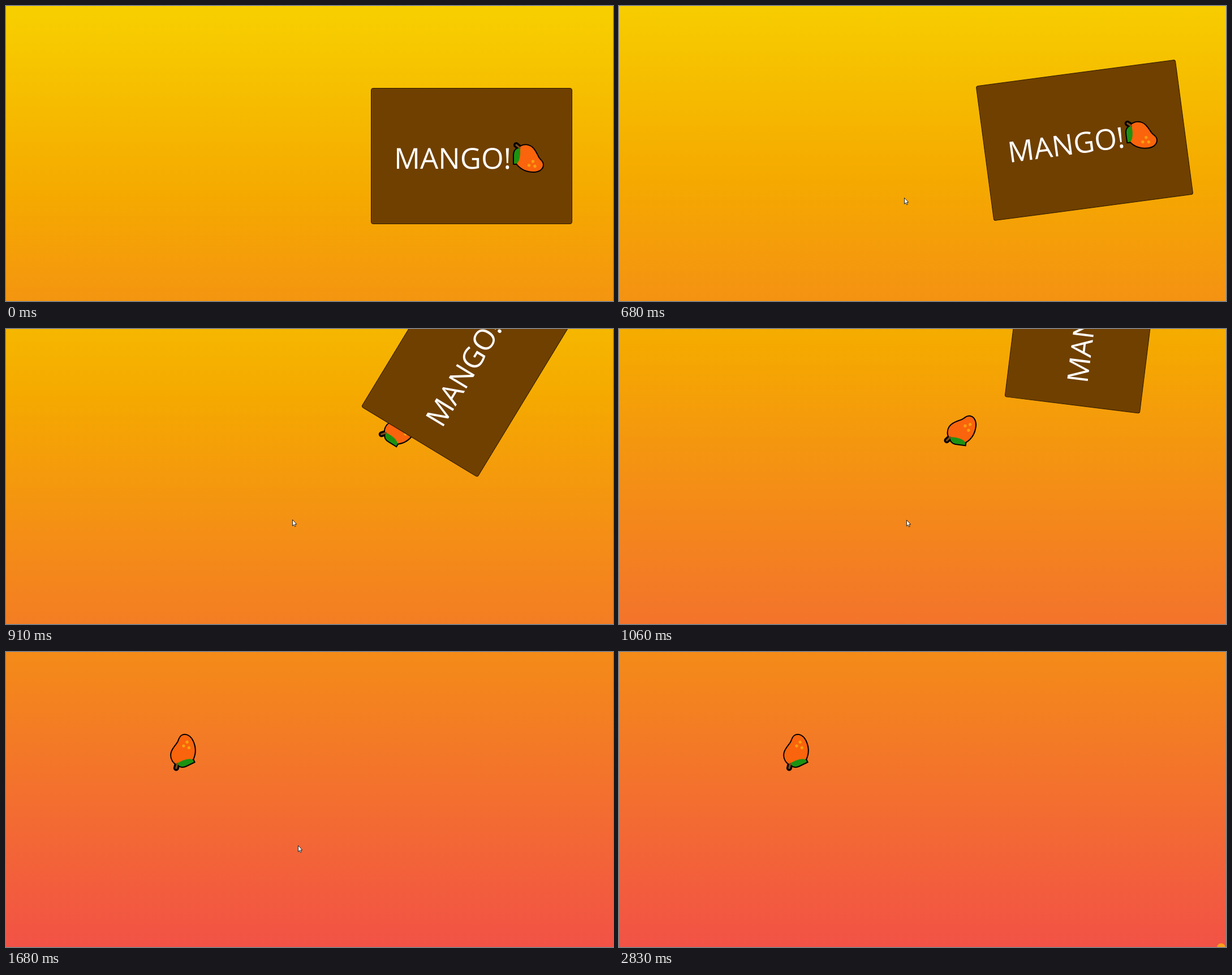
These frames come from a looping animation (1073 by 522 pixels, 2910 ms). An HTML page:

```html
<!DOCTYPE html>
<html lang="en">
<head>
<meta charset="utf-8">
<title>Mango</title>
<style>
  html, body { margin: 0; width: 100%; height: 100%; overflow: hidden; background: #f7d000; }
  svg { display: block; width: 100%; height: 100%; }
  text { font: 51px "Open Sans", "Noto Sans", sans-serif; fill: #fff; text-rendering: geometricPrecision; }
</style>
</head>
<body>
<svg viewBox="0 0 1073 522">
  <defs>
    <linearGradient id="sky" x1="0" y1="0" x2="0" y2="1">
      <stop offset="0" stop-color="#f7d000"/>
      <stop offset=".3" stop-color="#f5a900"/>
      <stop offset="1" stop-color="#f25246"/>
    </linearGradient>
    <path id="flesh" d="M-16-18C-12-22-4-23 2-20C9-17 13-8 17 0C20 5 25 7 25 13C25 20 18 25 9 25C-4 25-14 20-21 11Z"/>
    <path id="leaf" d="M-15-17C-22-16-26-12-26-4V11H-22C-17 8-16 2-15-6Z"/>
  </defs>

  <rect id="page" width="1073" height="1132" fill="url(#sky)"/>

  <g id="scene">
    <g id="card">
      <rect x="-177.5" y="-120" width="355" height="240" rx="3.5" fill="#704000" stroke="#2a1800"/>
      <text x="-137" y="22">MANGO!</text>
    </g>
    <g id="mango">
      <g stroke="#000" stroke-width="4">
        <use href="#flesh"/>
        <use href="#leaf"/>
      </g>
      <path d="M-22-22L-15-16" stroke="#000" stroke-width="10" stroke-linecap="round"/>
      <use href="#flesh" fill="#fa640c"/>
      <use href="#leaf" fill="#1c9212"/>
      <path d="M-22-22L-16-17" stroke="#7a4a1c" stroke-width="3.4" stroke-linecap="round"/>
      <g fill="#f5a010">
        <circle cx="7.5" cy="7" r="2.7"/>
        <circle cx=".5" cy="14" r="2.7"/>
        <circle cx="11" cy="15.5" r="2.7"/>
      </g>
    </g>
  </g>

  <circle id="dot" cx="1064.5" cy="523" r="7.5" fill="#f9a01e"/>
  <path id="cursor" d="M.5.5V11.3L2.9 9L4.6 12.7L6.3 11.9L4.7 8.3H7.8Z" fill="#fff" stroke="#111" stroke-width=".9"/>
</svg>

<script>
const LOOP = 2910;
const STEPS = [0, 70, 140, 210, 290, 360, 680, 760, 840, 910, 990, 1060, 1140,
  1220, 1310, 1380, 1460, 1530, 1600, 1680, 1830, 1910, 1990, 2070, 2830];

// time, scroll offset
const SCROLL = [[360, 0], [680, 28], [760, 90], [840, 163], [910, 217.5], [1220, 403], [1680, 610]];
// time, x, y
const POINTER = [[70, 833, 449], [140, 700, 400], [210, 590, 362], [290, 525, 343], [360, 504, 339],
  [840, 504, 339], [910, 506, 337], [1220, 510, 338], [1680, 516, 342],
  [1830, 570, 364], [1910, 705, 412], [1990, 880, 470]];
// scroll, x, y, turn of the loose fruit
const FRUIT = [[100, 811, 180, 27], [217.5, 694, 179, 58.6], [403, 508, 177, 108.9], [610, 311, 176, 116]];

const CARD = { x: 823, y: 265.5 };
const DETACH = 110;
const TURN = 0.27;

const $ = id => document.getElementById(id);
const [page, scene, card, mango, dot, cursor] =
  ["page", "scene", "card", "mango", "dot", "cursor"].map($);

function track(rows, at) {
  const last = rows[rows.length - 1];
  if (at <= rows[0][0]) return rows[0].slice(1);
  if (at >= last[0]) return last.slice(1);
  const i = rows.findIndex(r => r[0] > at);
  const a = rows[i - 1], b = rows[i];
  const k = (at - a[0]) / (b[0] - a[0]);
  return a.slice(1).map((v, j) => v + (b[j + 1] - v) * k);
}

function place(el, x, y, turn = 0) {
  el.setAttribute("transform", `translate(${x} ${y}) rotate(${-turn})`);
}

function show(el, on) {
  el.setAttribute("visibility", on ? "visible" : "hidden");
}

function fruitPose(scroll) {
  if (scroll > DETACH) return track(FRUIT, scroll);
  const turn = scroll * TURN, a = turn * Math.PI / 180;
  const dx = 101, dy = 2.5;
  return [CARD.x + dx * Math.cos(a) + dy * Math.sin(a),
    CARD.y - scroll - dx * Math.sin(a) + dy * Math.cos(a), turn];
}

function draw(t) {
  const [scroll] = track(SCROLL, t);
  place(page, 0, -scroll);
  place(card, CARD.x, CARD.y - scroll, scroll * TURN);
  place(mango, ...fruitPose(scroll));

  // once loose, the fruit passes behind the card
  const top = scroll > DETACH ? card : mango;
  if (scene.lastElementChild !== top) scene.append(top);

  place(cursor, ...track(POINTER, t));
  show(cursor, t >= 70 && t < 2070);
  show(dot, t >= 2830);
}

const start = performance.now();
function tick() {
  const t = (performance.now() - start) % LOOP;
  draw(STEPS.filter(s => s <= t).pop() || 0);
  requestAnimationFrame(tick);
}
tick();
</script>
</body>
</html>
```
